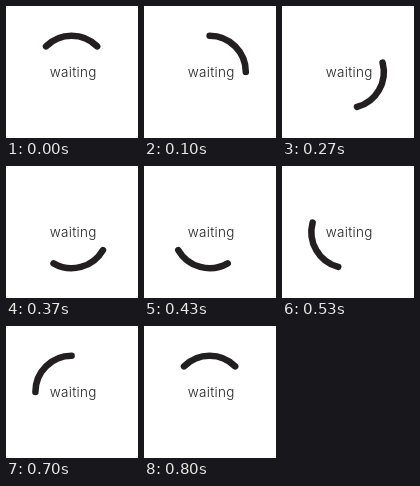
An HTML page for the animation above (830 ms loop, 132 px wide and 132 px high).

```html
<!DOCTYPE html>
<html lang="en">
<head>
<meta charset="utf-8">
<title>waiting</title>
<style>
  html, body { margin: 0; height: 100%; overflow: hidden; background: #fff; }
  svg { display: block; width: 100%; height: 100%; }
  path { fill: none; stroke: #231f20; stroke-width: 6.5; stroke-linecap: round; }
  text { font: 300 13.5px Inter, sans-serif; letter-spacing: .3px; text-anchor: middle; fill: #231f20; }
</style>
</head>
<body>
<svg viewBox="0 0 132 132">
  <path id="arc" d="M-25.6 -25.6A36.2 36.2 0 0 1 25.6 -25.6"/>
  <text x="67.2" y="71">waiting</text>
</svg>
<script>
  const LOOP = 830, STEP_ANGLE = 15;
  const arc = document.getElementById('arc');

  // 30 steps per second, with step starts rounded to 10 ms
  function draw() {
    const tick = Math.floor(performance.now() % LOOP / 10);
    const step = Math.floor((tick * 3 + 1) / 10);
    arc.setAttribute('transform', `translate(65.6 66) rotate(${step * STEP_ANGLE})`);
    requestAnimationFrame(draw);
  }
  draw();
</script>
</body>
</html>
```
